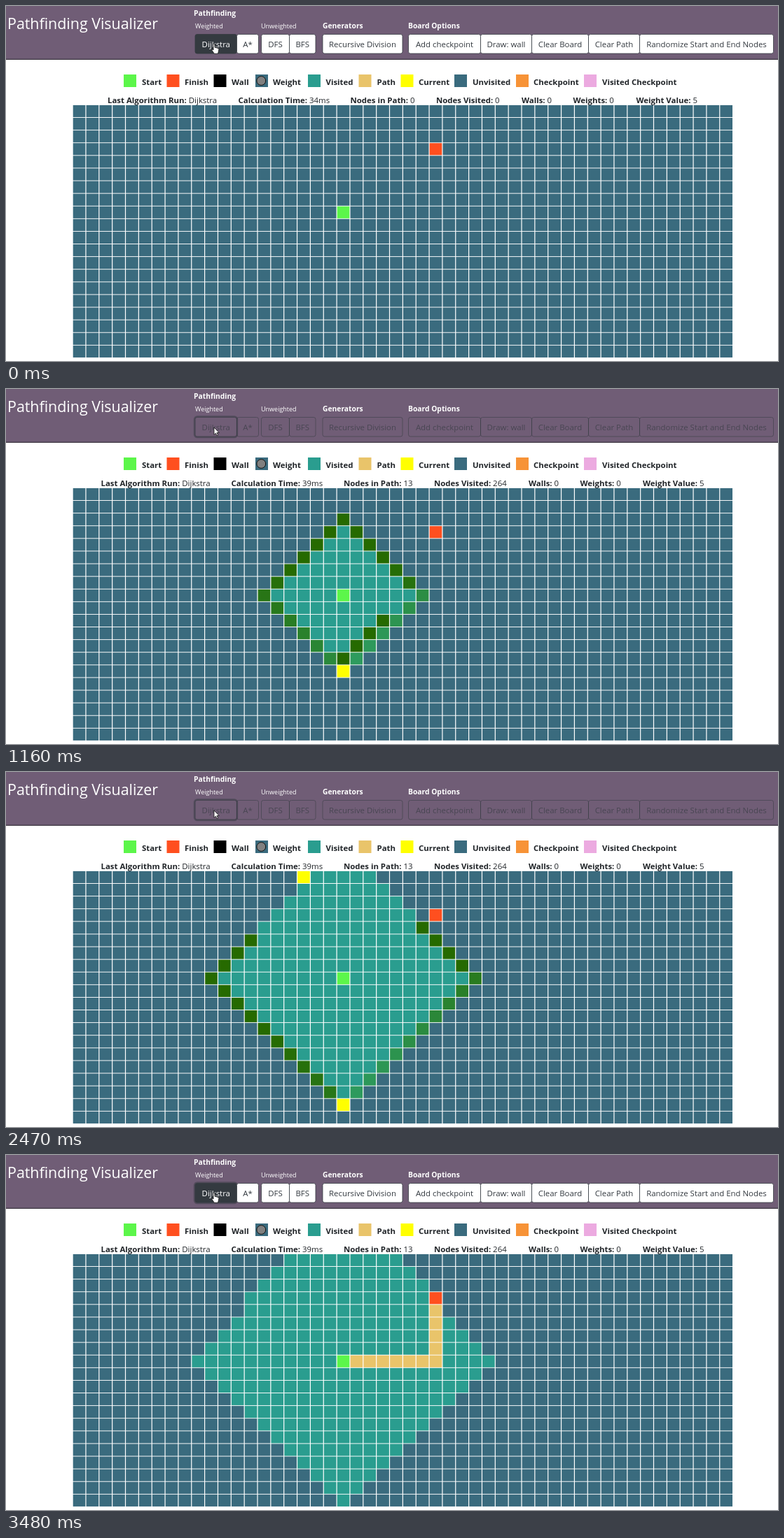
An HTML page for the animation above (4250 ms loop, 1102x508 px).

```html
<!DOCTYPE html>
<html lang="en">
<head>
<meta charset="utf-8">
<title>Pathfinding Visualizer</title>
<style>
html, body { margin: 0; width: 100%; height: 100%; overflow: hidden; background: #fff; }
svg { display: block; width: 100%; height: 100%; font: 11.42px "Open Sans", "Noto Sans", sans-serif; fill: #212529; }
.bold { font-weight: 700; }
.btn rect { fill: #fff; stroke: #343a40; stroke-width: .8; }
.btn text { fill: #343a40; text-anchor: middle; }
.btn.on rect { fill: #343a40; }
.btn.on text { fill: #fff; }
.busy .btn { opacity: .65; }
.busy .btn rect { fill: none; }
.busy .btn text { fill: #343a40; }
</style>
</head>
<body>
<svg id="stage" viewBox="0 0 1102 508"></svg>
<script>
const LOOP = 4250, FRAME = 77.33, COLS = 50, ROWS = 20;
const CELL_W = 18.85, CELL_H = 18.1;
const BUSY_FROM = 4, BUSY_TO = 45;
const START = [20, 8], FINISH = [27, 3];
const UNVISITED = '#3a6b7e', VISITED = '#2a9d8f', PATH = '#e9c46a', CURRENT = '#ffff00';
const START_FILL = '#5cf64a', FINISH_FILL = '#ff4f1f';

const rect = (x, y, w, h, more) => `<rect x="${x}" y="${y}" width="${w}" height="${h}" ${more}/>`;
const text = (x, y, s, more = '') => `<text x="${x}" y="${y}" ${more}>${s}</text>`;

const buttons = [
  ['Dijkstra', 270, 329.5], ['A*', 329.5, 360.5], ['DFS', 364.5, 404.5], ['BFS', 404.5, 442],
  ['Recursive Division', 452, 566], ['Add checkpoint', 574.5, 677.5], ['Draw: wall', 677.5, 750.5],
  ['Clear Board', 750.5, 831.5], ['Clear Path', 831.5, 904.5], ['Randomize Start and End Nodes', 904.5, 1095.5]
];
const legend = [
  ['Start', 168, 194, START_FILL], ['Finish', 229.5, 255, FINISH_FILL], ['Wall', 296.5, 322, '#000'],
  ['Weight', 356, 381, UNVISITED], ['Visited', 431, 456.5, VISITED], ['Path', 503.5, 529.5, PATH],
  ['Current', 563.5, 589, CURRENT], ['Unvisited', 640, 666, UNVISITED],
  ['Checkpoint', 728, 753, '#f79337'], ['Visited Checkpoint', 825, 851, '#ecaae0']
];
// label, x and value before the run, x and value after
const stats = [
  ['Last Algorithm Run', 145, 'Dijkstra', 135.5, 'Dijkstra'],
  ['Calculation Time', 331.5, '34ms', 321.5, '39ms'],
  ['Nodes in Path', 491.5, '0', 482, '13'],
  ['Nodes Visited', 614, '0', 611, '264'],
  ['Walls', 736, '0', 746, '0'],
  ['Weights', 809.5, '0', 819.5, '0'],
  ['Weight Value', 899.5, '5', 909, '5']
];

const button = ([label, a, b], i) => `<g class="btn${i ? '' : ' on'}">` +
  rect(a, 40.5, b - a, 27.5, 'rx="2.8"') + text((a + b) / 2, 59, label) + '</g>';

const statLine = after => stats.map(s =>
  text(s[after ? 3 : 1], 138.5, `<tspan class="bold">${s[0]}:</tspan> ${s[after ? 4 : 2]}`)).join('');

function cellRect(_, i) {
  const x = 95.7 + CELL_W * (i % COLS), y = 141.9 + CELL_H * Math.floor(i / COLS);
  return rect(x.toFixed(2), y.toFixed(2), CELL_W - 1.2, CELL_H - .95, `fill="${UNVISITED}"`);
}

const stage = document.getElementById('stage');
stage.innerHTML =
  rect(0, 0, 1102, 76, 'fill="#705d76"') + rect(0, 75.6, 1102, 1.4, 'fill="#453f49"') +
  '<g fill="#fff">' + text(2, 33, 'Pathfinding Visualizer', 'font-size="21.4"') +
  [['Pathfinding', 268, 14], ['Generators', 452, 31.5], ['Board Options', 574, 31.5]]
    .map(([s, x, y]) => text(x, y, s, 'class="bold" font-size="10.3"')).join('') +
  text(270, 32, 'Weighted', 'font-size="9"') + text(364, 32, 'Unweighted', 'font-size="9"') + '</g>' +
  rect(269, 39.5, 61, 29.5, 'id="ring" rx="4" fill="none" stroke="#343a40" stroke-opacity=".5" stroke-width="2.4"') +
  buttons.map(button).join('') +
  legend.map(([s, x, tx, fill]) => rect(x, 98, 18, 18, `fill="${fill}"`) + text(tx, 113, s, 'class="bold"')).join('') +
  '<circle cx="364.3" cy="107" r="6.4" fill="#808080" stroke="#111"/>' +
  `<g id="before">${statLine(false)}</g><g id="after">${statLine(true)}</g>` +
  `<g id="cells">${Array.from({ length: COLS * ROWS }, cellRect).join('')}</g>` +
  '<path id="hand" fill="#fff" stroke="#111" stroke-width=".8" stroke-linejoin="round" d="M296 54.5q1.2-1 2 .3v4.4l5 1.2q1 .3.9 1.5l-.8 4.3-.8 2h-5l-3.4-5q-.4-1.5 1.1-1.2l1 1z"/>' +
  '<path id="arrow" fill="#fff" stroke="#111" stroke-width=".8" d="M297 55v10.4l2.4-2.2 1.6 3.6 1.6-.7-1.6-3.5h3.2z"/>';

const byId = id => document.getElementById(id);
const cells = [...byId('cells').children];
const show = (id, on) => byId(id).style.display = on ? '' : 'none';
const cellId = ([c, r]) => r * COLS + c;
const startId = cellId(START), finishId = cellId(FINISH);

// Breadth-first search in the order up, left, right, down
function search() {
  const order = [START], seen = new Set([startId]);
  for (let i = 0; i < order.length; i++) {
    const [c, r] = order[i];
    for (const [dc, dr] of [[0, -1], [-1, 0], [1, 0], [0, 1]]) {
      const next = [c + dc, r + dr], id = cellId(next);
      if (next[0] < 0 || next[0] >= COLS || next[1] < 0 || next[1] >= ROWS || seen.has(id)) continue;
      seen.add(id);
      order.push(next);
      if (id === finishId) return order.map(cellId);
    }
  }
}
const visits = search();
const route = [];
for (let c = START[0]; c <= FINISH[0]; c++) route.push(cellId([c, START[1]]));
for (let r = START[1] - 1; r > FINISH[1]; r--) route.push(cellId([FINISH[0], r]));

const mix = (a, b, p) => `rgb(${a.map((v, i) => Math.round(v + (b[i] - v) * p))})`;
const smooth = p => p * p * (3 - 2 * p);

function visitFill(age) {
  if (age < 1.433) return CURRENT;
  if (age < 28.42) return mix([46, 156, 96], [38, 106, 0], smooth(Math.min(1, age / 18)));
  return VISITED;
}

const glow = [[150, 40, 24], [212, 124, 34], [240, 160, 42], [236, 176, 70]];
function pathFill(age) {
  const i = Math.floor(age);
  return age < 2.85 ? mix(glow[i], glow[i + 1], age - i) : PATH;
}

function draw(k) {
  const busy = k >= BUSY_FROM && k < BUSY_TO, done = k >= BUSY_TO;
  stage.classList.toggle('busy', busy);
  show('ring', k >= BUSY_FROM);
  show('before', k < BUSY_FROM);
  show('after', k >= BUSY_FROM);
  show('hand', !busy);
  show('arrow', busy);
  byId('hand').setAttribute('transform', k === 1 ? 'translate(-3 -3)' : '');

  const fills = Array(COLS * ROWS).fill(UNVISITED);
  fills[finishId] = FINISH_FILL;
  const visited = done ? 999 : 37.66 + 7.798 * (k - 9);
  visits.forEach((id, i) => {
    const age = visited - i;
    if (age >= 0 && !(id === finishId && age >= 28.42)) fills[id] = visitFill(age);
  });
  const walked = 5.1 + 2.15 * (k - 40);
  route.forEach((id, i) => {
    if (walked >= i) fills[id] = pathFill(walked - i);
  });
  fills[startId] = START_FILL;
  cells.forEach((cell, i) => cell.setAttribute('fill', fills[i]));
}

let last = -1;
function tick() {
  const t = performance.now() % LOOP;
  const k = Math.min(BUSY_TO, Math.floor((t + 8) / FRAME));
  if (k !== last) draw(last = k);
  requestAnimationFrame(tick);
}
tick();
</script>
</body>
</html>
```
